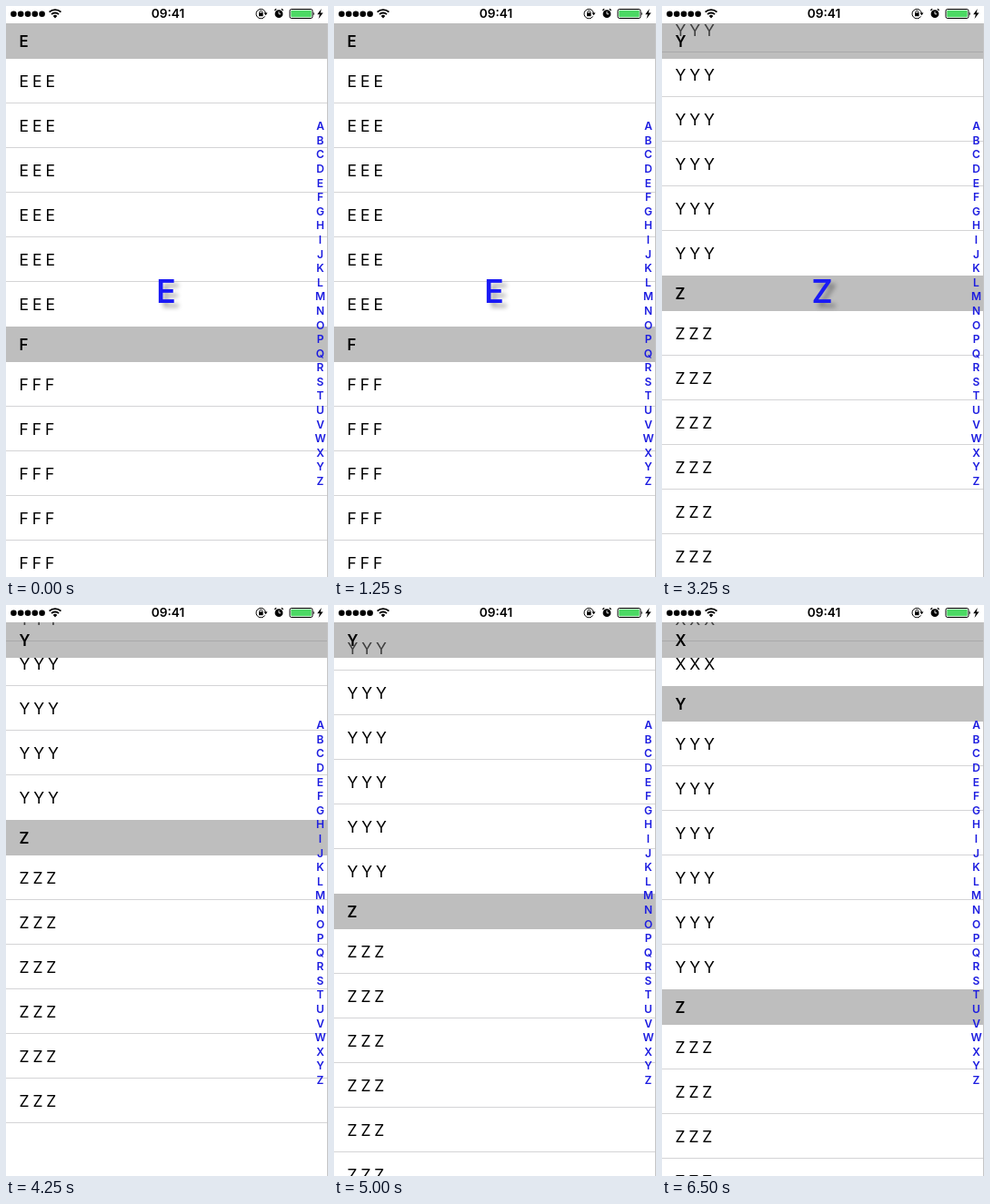
These frames come from a looping animation (354x627 px, 7000 ms). An HTML page:

```html
<!DOCTYPE html>
<html lang="en">
<head>
<meta charset="utf-8">
<title>Indexed list</title>
<style>
  html, body { margin: 0; width: 100%; height: 100%; overflow: hidden; background: #fff; }
  #stage {
    position: relative; width: 354px; height: 627px; overflow: hidden;
    background: #fff; color: #000; font-family: Inter, Roboto, sans-serif;
  }
  #status { position: absolute; left: 0; top: 0; }
  #list {
    position: absolute; left: 0; top: 19px; width: 354px; height: 608px;
    overflow: hidden; isolation: isolate;
  }
  #list::after { content: ""; display: block; height: 200px; }
  h2, p { margin: 0; padding-left: 14.5px; box-sizing: border-box; }
  h2 {
    position: sticky; top: 0; z-index: 1; height: 39px;
    font: 600 16.8px/41px Inter, Roboto, sans-serif;
    background: rgba(127, 127, 127, .5);
  }
  p {
    height: 49px; font-size: 17.5px; line-height: 49px; word-spacing: -1px;
    border-bottom: 1px solid #d4d4d6;
  }
  section:not(:last-child) p:last-child { border-color: transparent; }
  #edge { position: absolute; right: 0; top: 19px; width: 1px; height: 608px; background: #c4c4c6; }
  #index {
    position: absolute; left: 335.5px; top: 124.2px; width: 20px;
    color: #1c1ce0; font-size: 12px; font-weight: 600; line-height: 15.6px; text-align: center;
  }
  #popup {
    position: absolute; left: 136px; top: 289px; width: 80px;
    color: #1a1af5; font-size: 35.5px; font-weight: 600; line-height: 50px; text-align: center;
    text-shadow: 5px 5px 5px rgba(0, 0, 0, .32);
  }
</style>
</head>
<body>
<div id="stage">
  <div id="list"></div>
  <div id="edge"></div>
  <div id="index"></div>
  <div id="popup"></div>
  <svg id="status" width="354" height="19">
    <path d="M8.4 8.8h31.5" stroke="#000" stroke-width="6.6" stroke-linecap="round" stroke-dasharray="0 7.8"/>
    <g fill="none" stroke="#000" stroke-width="1.8">
      <path d="M47.6 6.7a9 9 0 0 1 12.8 0M50 9.2a5.6 5.6 0 0 1 8 0"/>
    </g>
    <path d="M54 13.4l-2.3-2.5a3.3 3.3 0 0 1 4.6 0z"/>
    <text x="178" y="13.4" text-anchor="middle" font-size="13.7" font-weight="600">09:41</text>
    <g fill="none" stroke="#000">
      <path d="M284.6 11.4a5.2 5.2 0 1 1 .8-3.4"/>
      <path d="M278.9 8V6.6a1.4 1.4 0 0 1 2.8 0V8" stroke-width=".9"/>
      <path d="M297.2 3.2l-1.9 1.5M302.8 3.2l1.9 1.5" stroke-width="1.3"/>
      <rect x="312" y="3.5" width="25" height="10" rx="1.8"/>
    </g>
    <path d="M283.5 7.6h4l-2 2.6zM278 7.6h4.6v3.6h-4.6z"/>
    <circle cx="300" cy="8.7" r="4.4"/>
    <path d="M300 6v2.8h2.2" fill="none" stroke="#fff" stroke-width=".9"/>
    <rect x="313.3" y="4.8" width="22.4" height="7.4" rx=".8" fill="#4cd964"/>
    <path d="M337.8 6.5q2 2 0 4zM346.8 3l-4.6 6.2h2.7l-1.3 4.8 5-6.4h-2.9z"/>
  </svg>
</div>
<script>
  const LOOP = 7000, SECTION = 333, END = 8048;
  const letters = [..."ABCDEFGHIJKLMNOPQRSTUVWXYZ"];
  const $ = id => document.getElementById(id);
  const list = $("list"), popup = $("popup");

  list.innerHTML = letters.map(c =>
    `<section><h2>${c}</h2>${`<p>${c} ${c} ${c}</p>`.repeat(6)}</section>`).join("");
  $("index").innerHTML = letters.join("<br>");

  // Letter under the finger: [start ms, letter, popup opacity]
  const touches = [
    [0, "E"], [250, "D"], [500, "B"], [750, "A"], [1000, "C"], [1250, "E"],
    [1500, "G"], [1750, "I"], [2250, "K"], [2500, "M"], [2750, "P"], [3000, "T"],
    [3250, "Z"], [3500, "Z", .6], [3750, "Z", .25], [4000, "Z", 0]
  ];
  // Free scrolling after release: [start ms, offset]
  const drags = [
    [4000, 8061], [4250, 8108], [4500, 8124], [4750, 8060],
    [5000, 8027], [5250, 7968], [5500, 7922]
  ];
  const at = (steps, t) => steps.findLast(s => s[0] <= t);

  function draw(now) {
    const t = now % LOOP;
    const [, letter, opacity = 1] = at(touches, t);
    const drag = at(drags, t);
    popup.textContent = letter;
    popup.style.opacity = opacity;
    list.scrollTop = drag ? drag[1] : Math.min(letters.indexOf(letter) * SECTION, END);
  }

  const start = performance.now();
  function tick() {
    draw(performance.now() - start);
    requestAnimationFrame(tick);
  }
  tick();
</script>
</body>
</html>
```
